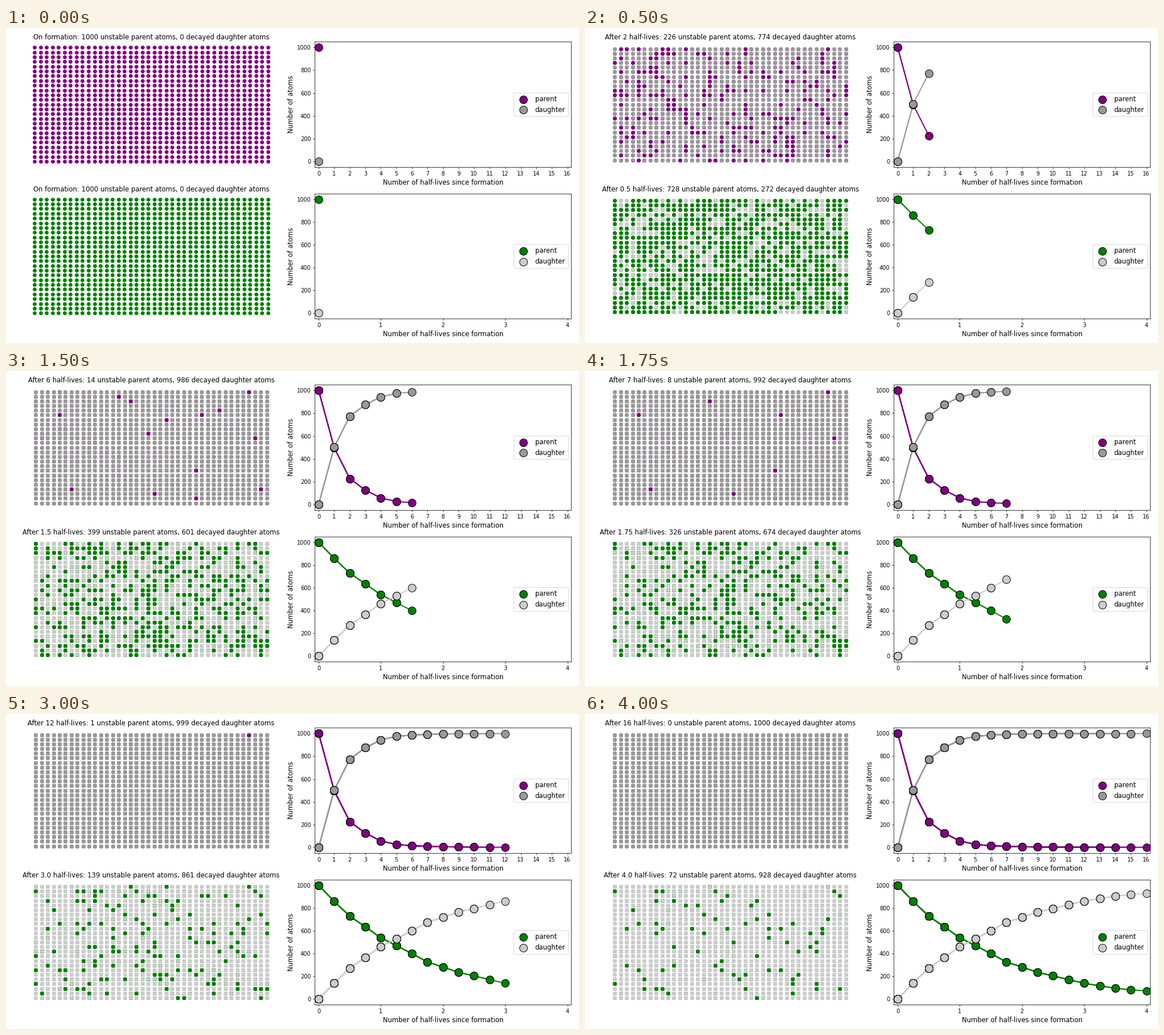
A matplotlib script that plays this animation: 1008 by 555 pixels, repeating every 4.25 s.

```python
import numpy as np
import matplotlib.pyplot as plt
from matplotlib.animation import FuncAnimation

W, H, DPI = 1008, 555, 70
COLS, ROWS = 40, 25
TOTAL = COLS * ROWS
STEPS = 17
FONT = 12

plt.rcParams["font.family"] = "DejaVu Sans"
rng = np.random.default_rng(4)

# Parent atoms left after each step
FAST = [1000, 497, 226, 125, 56, 25, 14, 8, 5, 3, 2, 1, 1, 1, 1, 1, 0]
SLOW = [1000, 859, 728, 635, 538, 470, 399, 326, 281, 235, 204, 170, 139,
        116, 96, 81, 72]
# (row, column) of the fast atoms that hold out longest
SURVIVORS = [(5, 28), (2, 16), (0, 36)]


def decay_order(last=()):
    """Atom indices in random order of decay, ending with the given cells."""
    tail = [r * COLS + c for r, c in last]
    mixed = rng.permutation(TOTAL)
    return np.append(mixed[~np.isin(mixed, tail)], tail).astype(int)


fig = plt.figure(figsize=(W / DPI, H / DPI), dpi=DPI, facecolor="white")


def add_axes(left, top, width, height):
    return fig.add_axes([left / W, 1 - (top + height) / H,
                         width / W, height / H])


class Panel:
    """A grid of atoms next to the chart of its counts."""

    def __init__(self, top, counts, order, step, parent, daughter):
        self.counts, self.step = counts, step
        self.grid = add_axes(29.75, top, 451.5, 220.6)
        self.grid.axis("off")
        self.chart = add_axes(543.2, top, 451.2, 220.6)
        # Every step paints over the earlier ones, leaving faint rims
        self.layers = [self.add_layer(k, order, parent, daughter)
                       for k in range(STEPS)]
        self.style_chart()

    def add_layer(self, k, order, parent, daughter):
        times = np.arange(k + 1) * self.step
        alive = np.array(self.counts[:k + 1])
        cut = TOTAL - self.counts[k]
        layer = []
        for ids, values, color, name in (
                (order[cut:], alive, parent, "parent"),
                (order[:cut], TOTAL - alive, daughter, "daughter")):
            layer.append(self.grid.scatter(ids % COLS, ROWS - 1 - ids // COLS,
                                           s=36, color=color))
            layer += self.chart.plot(times, values, color=color, lw=2,
                                     zorder=1)
            layer.append(self.chart.scatter(
                times, values, s=200, color=color, edgecolors="black",
                zorder=2, label=name if k == 0 else None))
        return layer

    def style_chart(self):
        ax, end = self.chart, (STEPS - 1) * self.step
        pad = end / 64
        ax.set_xlim(-pad, end + pad)
        ax.set_ylim(-50, 1050)
        ax.set_xticks(range(int(end) + 1))
        ax.set_yticks(range(0, 1001, 200))
        ax.set_xlabel("Number of half-lives since formation", fontsize=FONT)
        ax.set_ylabel("Number of atoms", fontsize=FONT)
        ax.legend(loc="center right", fontsize=FONT)

    def show(self, k):
        for j, layer in enumerate(self.layers):
            for artist in layer:
                artist.set_visible(j <= k)
        mx, my = (2.16, 1.51) if k else (1.95, 1.2)
        self.grid.set_xlim(-mx, COLS - 1 + mx)
        self.grid.set_ylim(-my, ROWS - 1 + my)
        when = f"After {k * self.step} half-lives" if k else "On formation"
        n = self.counts[k]
        self.grid.set_title(f"{when}: {n} unstable parent atoms, "
                            f"{TOTAL - n} decayed daughter atoms",
                            fontsize=FONT, pad=4)


panels = [
    Panel(24.3, FAST, decay_order(SURVIVORS), 1, "purple", "0.6"),
    Panel(291.7, SLOW, decay_order(), 0.25, "green", "0.8"),
]


def update(k):
    for panel in panels:
        panel.show(k)


anim = FuncAnimation(fig, update, frames=STEPS, init_func=lambda: update(0),
                     interval=250, repeat=True, blit=False)
plt.show()
```
